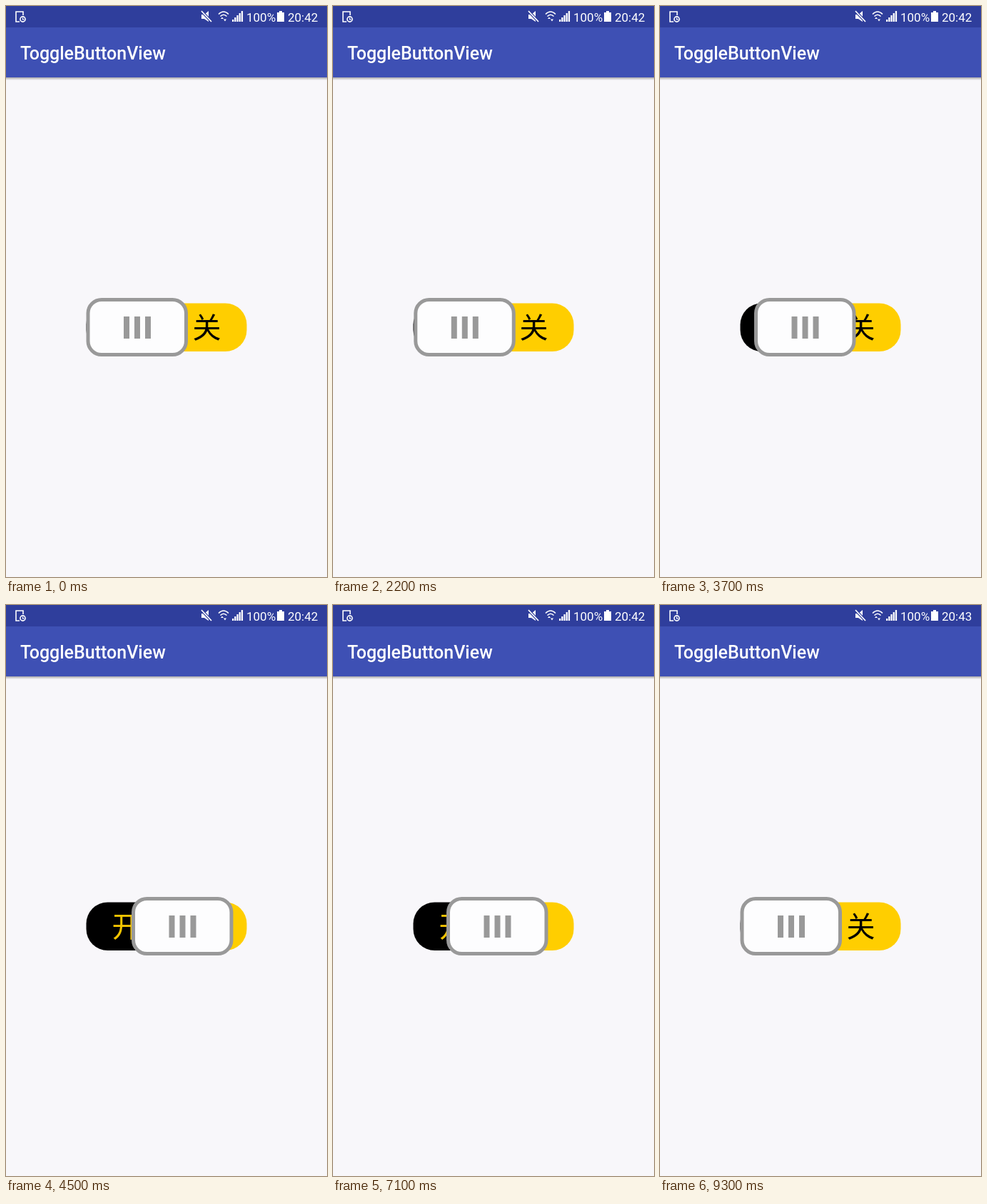
An HTML page for the animation above (9.4 s loop, 450 px wide and 800 px high).

```html
<!DOCTYPE html>
<html lang="zh-CN">
<head>
<meta charset="utf-8">
<title>ToggleButtonView</title>
<style>
  html, body { margin: 0; width: 100%; height: 100%; overflow: hidden; background: #f8f7fa; }
  svg { display: block; width: 450px; height: 800px; }
  text { font-family: Roboto, sans-serif; fill: #fff; }
  .label { font: 40px "Noto Sans CJK SC", "Noto Sans CJK", sans-serif; text-anchor: middle; }
</style>
</head>
<body>
<svg viewBox="0 0 450 800">
  <defs>
    <linearGradient id="shadow" x2="0" y2="1">
      <stop stop-color="#000" stop-opacity=".32"/>
      <stop offset="1" stop-color="#000" stop-opacity="0"/>
    </linearGradient>
    <clipPath id="track"><rect x="112.5" y="416.5" width="225" height="67.5" rx="30"/></clipPath>
  </defs>

  <rect width="450" height="800" fill="#f8f7fa"/>
  <rect y="100" width="450" height="4" fill="url(#shadow)"/>
  <rect width="450" height="100" fill="#3e50b4"/>
  <rect width="450" height="30" fill="#2f3e9c"/>
  <text x="20" y="75" font-size="25" font-weight="500">ToggleButtonView</text>

  <!-- status bar -->
  <g fill="none" stroke="#fff" stroke-width="1.6">
    <path d="M24 13V8H14V22H19"/>
    <circle cx="23.5" cy="18.5" r="3.6"/>
    <path d="M23.5 16.5V18.8H25.5" stroke-width="1.2"/>
    <path d="M298 11.5Q305 4.500 312 11.500M300.500 14.500Q305 10 309.500 14.500"/>
  </g>
  <g fill="#fff">
    <path d="M274 12H278L284 7V22L278 18H274Z"/>
    <path d="M301 18L303 15.500 305 18ZM305 18.500H309L307 21.500Z"/>
    <path id="signal"/>
    <path d="M383 7H387V9H390V22H380V9H383Z"/>
  </g>
  <path d="M274 7L288 22" stroke="#2f3e9c" stroke-width="4"/>
  <path d="M274 7L288 22" stroke="#fff" stroke-width="1.7"/>
  <text x="337" y="22" font-size="17">100%</text>
  <text id="clock" x="395" y="22" font-size="17">20:42</text>

  <!-- toggle -->
  <g clip-path="url(#track)">
    <rect x="112" y="416" width="113" height="69"/>
    <rect x="225" y="416" width="113" height="69" fill="#ffce00"/>
  </g>
  <text class="label" x="168.500" y="465" style="fill:#f3c400">开</text>
  <text class="label" x="281.500" y="465" style="fill:#000">关</text>
  <g id="knob">
    <rect x="2.500" y="411.500" width="137.500" height="77" rx="19" fill="#fdfdfe" stroke="#999" stroke-width="5"/>
    <path d="M56.500 435V466M71.500 435V466M86.500 435V466" stroke="#999" stroke-width="8"/>
  </g>
</svg>
<script>
  const LOOP = 9400, STEP = 100, OFF = 112.5, ON = 195.5;
  const byId = id => document.getElementById(id);

  byId("signal").setAttribute("d", [0, 1, 2, 3, 4]
    .map(i => `M${317 + i * 3.2} 22v${-3 - i * 3}h2.3V22Z`).join(""));

  // Resting positions by start time; a tap or a release jumps at once.
  const rests = [[0, OFF], [800, ON], [1600, OFF], [3100, OFF], [5200, ON],
    [6500, ON], [8100, OFF], [8600, ON], [9300, OFF]];

  // Finger drags: [time, knob left] points, held until the release.
  const drags = [
    { end: 3100, points: [[2200, 113.3], [2500, 150], [2600, 150], [2700, 157.5], [2800, 157.5], [2900, 151.5]] },
    { end: 5200, points: [[3500, 114], [3700, 132], [4100, 155], [4500, 176], [4700, 193], [5000, 164]] },
    { end: 6500, points: [[5800, 194], [6000, 180], [6200, 164]] },
    { end: 8100, points: [[6900, 190], [7100, 159], [7300, 147]] },
  ];

  function along(points, t) {
    const next = points.findIndex(p => p[0] > t);
    if (next < 0) return points[points.length - 1][1];
    const [t0, x0] = points[next - 1], [t1, x1] = points[next];
    return x0 + (x1 - x0) * (t - t0) / (t1 - t0);
  }

  function knobLeft(t) {
    const drag = drags.find(d => t >= d.points[0][0] && t < d.end);
    return drag ? along(drag.points, t) : rests.filter(r => r[0] <= t).pop()[1];
  }

  function draw() {
    const t = Math.floor(performance.now() % LOOP / STEP) * STEP;
    byId("knob").setAttribute("transform", `translate(${knobLeft(t)})`);
    byId("clock").textContent = t < 8100 ? "20:42" : "20:43";
    requestAnimationFrame(draw);
  }
  draw();
</script>
</body>
</html>
```
